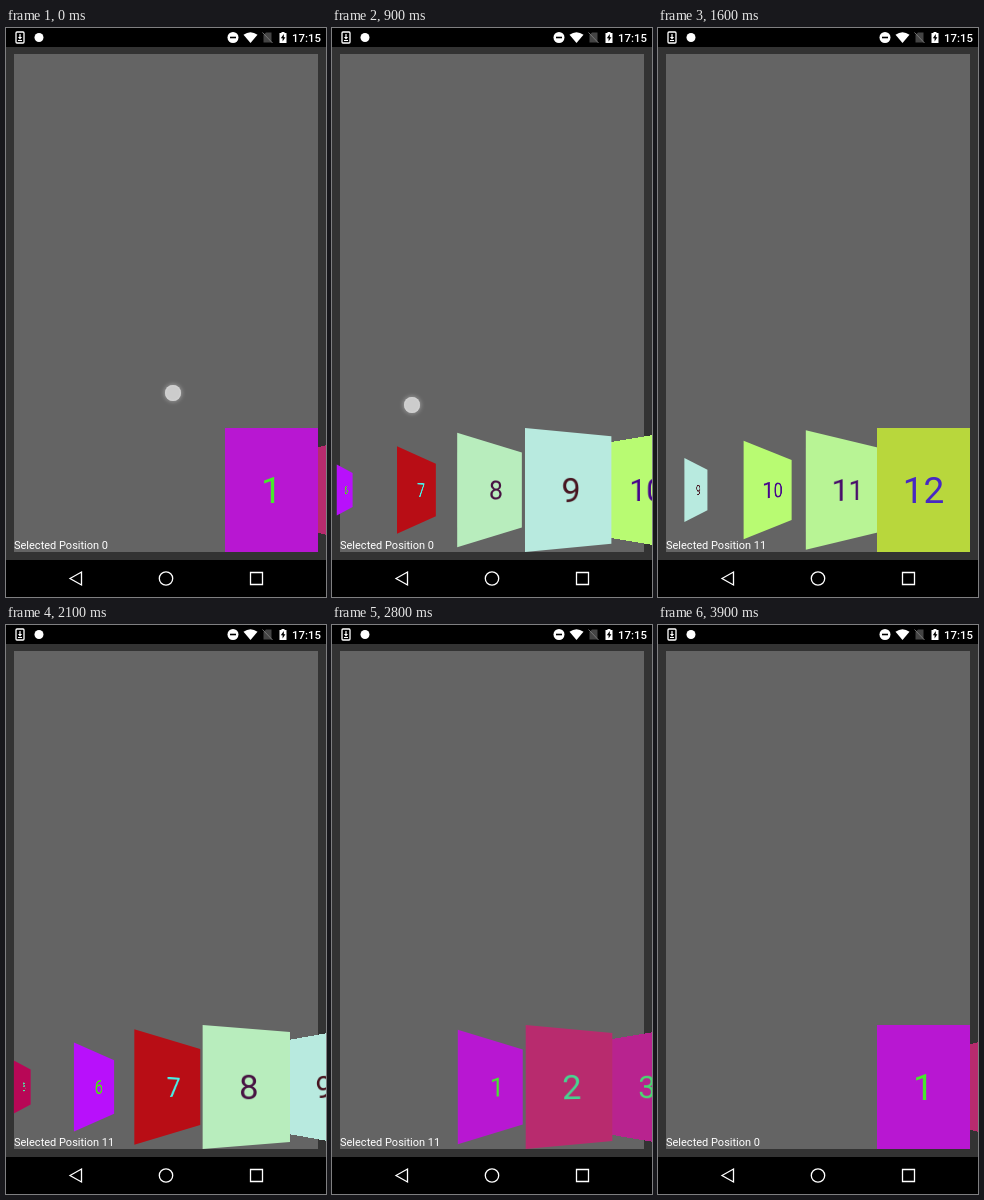
An HTML page for the animation above (4 s loop, 320 by 569 pixels).

```html
<!DOCTYPE html>
<html lang="en">
<head>
<meta charset="utf-8">
<title>Card carousel</title>
<style>
html, body { margin: 0; width: 100%; height: 100%; overflow: hidden; background: #000; }
body, text { font-family: Roboto, sans-serif; }
#stage { position: relative; width: 320px; height: 569px; overflow: hidden; }
#stage > * { position: absolute; }
#back { left: 0; top: 19px; width: 320px; height: 513px; background: #333; }
#panel { left: 8px; top: 26px; width: 304px; height: 498px; background: #646464; }
#bars { left: 0; top: 0; z-index: 200; }
#label { left: 8px; top: 511px; z-index: 150; font-size: 11px; line-height: 13px; color: #fff; white-space: pre; }
#touch {
  left: -8px; top: -8px; width: 16px; height: 16px; z-index: 160; border-radius: 50%;
  background: #ccc; box-shadow: inset 0 0 2px #e2e2e2, 0 0 4px 1px #999;
}
.card {
  left: 219px; top: 400px; width: 93px; height: 124px;
  font-size: 37px; line-height: 126px; text-align: center;
}
</style>
</head>
<body>
<div id="stage">
  <div id="back"></div>
  <div id="panel"></div>
  <div id="label"></div>
  <div id="touch"></div>
  <svg id="bars" width="320" height="569" fill="#fff">
    <path d="M0 0H320V19H0ZM0 532H320V569H0Z" fill="#000"/>
    <rect x="10" y="4" width="8" height="11" rx="1" fill="none" stroke="#fff" stroke-width="1.3"/>
    <path d="M13.4 6h1.2v3h1.5L14 11.4 11.900 9h1.500ZM12 12h4v1h-4Z"/>
    <circle cx="33" cy="9.500" r="4.500"/>
    <circle cx="227" cy="9.500" r="5.500"/>
    <path d="M224 8.700h6v1.600h-6Z" fill="#000"/>
    <path d="M237.500 6.800Q244.500 1.800 251.500 6.800L244.500 15Z"/>
    <path d="M260 4.500H265.500V14.500H257.500V7Z" fill="#444"/>
    <path d="M256.500 4.500L266.500 15" stroke="#777"/>
    <path d="M273.500 5H275.500V4H278.500V5H280.500V15H273.500Z"/>
    <path d="M277.800 6L274.800 10.300H276.600V13.500L279.400 9.200H277.800Z" fill="#000"/>
    <text x="286" y="13.500" font-size="11.400" font-weight="500">17:15</text>
    <g fill="none" stroke="#fff" stroke-width="1.300">
      <path d="M64 550.500L75.500 544V557ZM244.500 544.500H256.500V556.500H244.500Z"/>
      <circle cx="160" cy="550.500" r="6.700"/>
    </g>
  </div>
  </svg>
</div>
<script>
const LOOP = 4000, STEP = 100;
const SPACING = 75, REACH = 5;

// Green and blue channels; every card shares the same red.
const tones = '17d2 2b6e 238f 0433 0756 10fb 0d15 edbd eadf fb72 f495 d73c'.split(' ');

// [ms, carousel position]
const scroll = [
  [0, 0], [100, 0.6], [200, 2.2], [300, 4.1], [400, 5.6], [500, 6.7], [600, 7.2], [800, 7.4],
  [900, 8.35], [1000, 9.8], [1100, 10.7], [1200, 10.97], [1300, 11], [1800, 11],
  [1900, 10.5], [2000, 9.1], [2100, 7.3], [2200, 5.6], [2300, 4.2], [2400, 3.2], [2500, 2.5],
  [2700, 1.6], [2900, 1.08], [3000, 1], [3300, 1], [3400, 0.7], [3500, 0.25], [3600, 0], [4000, 0]
];

// [start ms, end ms, from x, to x, from y, to y]
const swipes = [
  [0, 200, 167, 50, 365, 371],
  [700, 1000, 200, 20, 376, 377.5],
  [1800, 2000, 110, 270, 393, 393],
  [3200, 3400, 268, 290, 388, 388]
];

const labels = [[3600, 0], [3000, 1], [1300, 11], [0, 0]];

const stage = document.getElementById('stage');
const label = document.getElementById('label');
const touch = document.getElementById('touch');
const mix = (a, b, u) => a + (b - a) * u;

const cards = tones.map((tone, i) => {
  const card = document.createElement('div');
  const rgb = parseInt('b8' + tone, 16);
  const hex = n => '#' + n.toString(16).padStart(6, '0');
  card.className = 'card';
  card.textContent = i + 1;
  card.style.background = hex(rgb);
  card.style.color = hex(0xffffff - rgb);
  stage.append(card);
  return card;
});

function positionAt(t) {
  const i = scroll.findIndex(([time]) => time > t);
  const [t0, p0] = scroll[i - 1], [t1, p1] = scroll[i];
  return mix(p0, p1, (t - t0) / (t1 - t0));
}

function placeCard(card, offset) {
  const distance = Math.abs(offset);
  const scale = 1 - distance / REACH;
  card.style.display = distance < 4.5 ? '' : 'none';
  card.style.zIndex = 100 - Math.round(distance * 20);
  card.style.transform = `translateX(${offset * SPACING}px) perspective(67px) ` +
    `scale3d(${scale}, ${scale}, ${scale}) rotateY(${-offset * 90 / REACH}deg)`;
}

function draw(now) {
  const t = Math.floor(now % LOOP / STEP) * STEP;
  const position = positionAt(t);
  cards.forEach((card, i) => placeCard(card, i - position));
  label.textContent = 'Selected Position ' + labels.find(([time]) => t >= time)[1];

  const swipe = swipes.find(([start, end]) => t >= start && t <= end);
  touch.style.display = swipe ? '' : 'none';
  if (swipe) {
    const [start, end, x0, x1, y0, y1] = swipe;
    const u = (t - start) / (end - start);
    touch.style.transform = `translate(${mix(x0, x1, u)}px, ${mix(y0, y1, u)}px)`;
  }
  requestAnimationFrame(draw);
}
requestAnimationFrame(draw);
</script>
</body>
</html>
```
